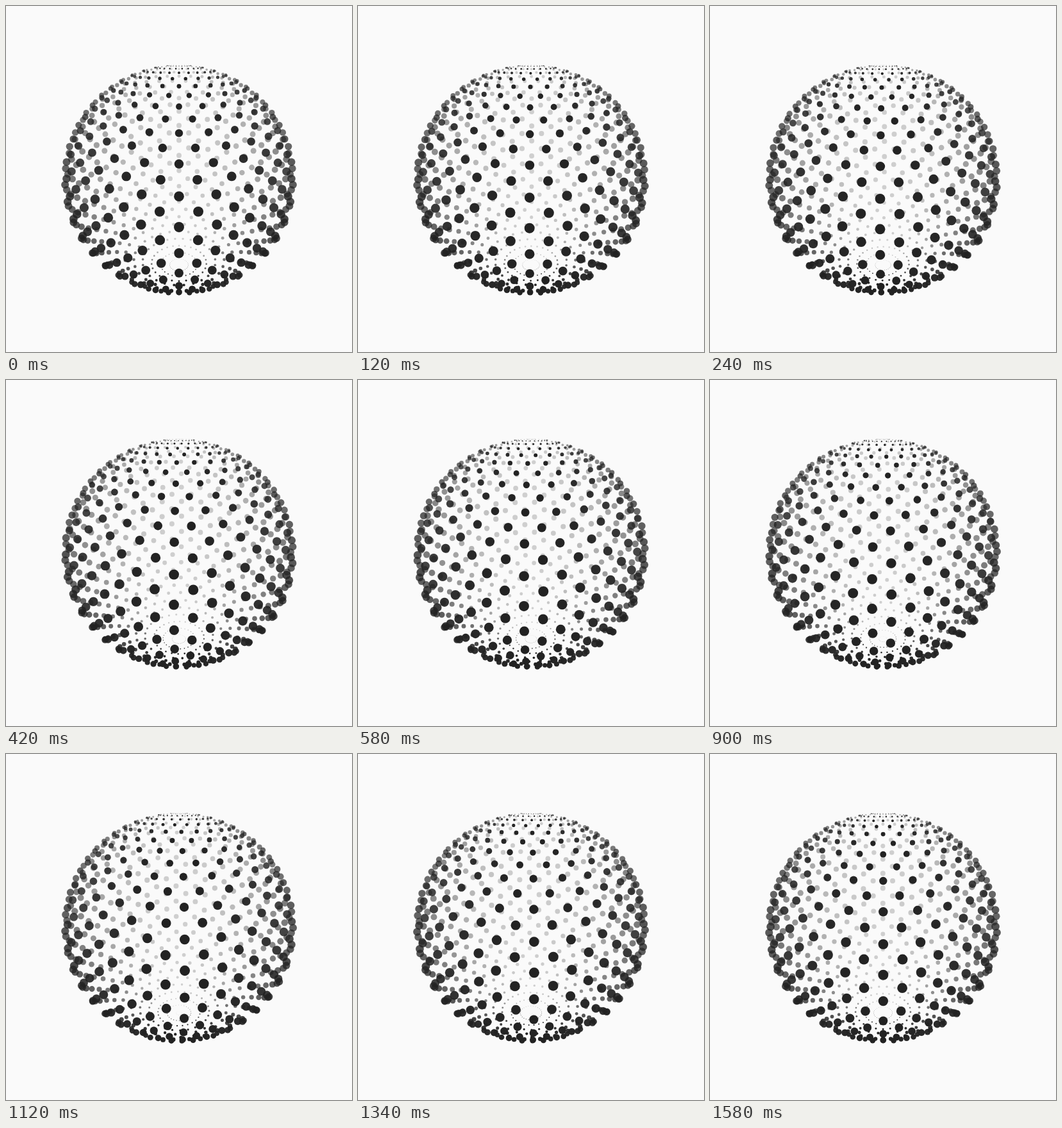
Recreate the animation shown at these times as an HTML page with a canvas. Size 540x540 px, loop 1.6 s.

```html
<!DOCTYPE html>
<html lang="en">
<head>
<meta charset="utf-8">
<title>Dotted sphere</title>
<style>
  html, body { margin: 0; width: 100%; height: 100%; overflow: hidden; background: #fafafa; }
  canvas { display: block; width: 540px; height: 540px; }
</style>
</head>
<body>
<canvas id="stage" width="540" height="540"></canvas>
<script>
const ctx = document.getElementById('stage').getContext('2d');
const LOOP = 1600;
const ROWS = 32, COLS = 26;
const CENTER = 270, SCALE = 166.3, CAMERA = 2.8;
const TILT = 0.4, DOT = 5.3;
const cosT = Math.cos(TILT), sinT = Math.sin(TILT);

// Each strand slides one row down and half a column left per loop.
function place(row, col, phase) {
  const step = row + phase;
  const theta = Math.PI * step / ROWS;
  const phi = Math.PI * (2 * col + 1 - step) / COLS;
  const ring = Math.sin(theta);
  const x = ring * Math.sin(phi);
  const y = Math.cos(theta);
  const z = ring * Math.cos(phi);
  const depth = z * cosT + y * sinT;
  const zoom = CAMERA / (CAMERA - depth);
  return {
    x: CENTER + SCALE * zoom * x,
    y: CENTER - SCALE * zoom * (y * cosT - z * sinT),
    r: DOT * zoom * ring,
    alpha: 0.6 + 0.4 * Math.cos(phi),
    depth
  };
}

function draw(phase) {
  const dots = [];
  for (let row = 0; row < ROWS; row++)
    for (let col = 0; col < COLS; col++) dots.push(place(row, col, phase));
  dots.sort((a, b) => a.depth - b.depth);

  ctx.globalAlpha = 1;
  ctx.fillStyle = '#fafafa';
  ctx.fillRect(0, 0, 540, 540);
  ctx.fillStyle = '#222';
  for (const d of dots) {
    ctx.globalAlpha = d.alpha;
    ctx.beginPath();
    ctx.arc(d.x, d.y, d.r, 0, 2 * Math.PI);
    ctx.fill();
  }
}

const start = performance.now();
function tick() {
  draw((performance.now() - start) % LOOP / LOOP);
  requestAnimationFrame(tick);
}
tick();
</script>
</body>
</html>
```
